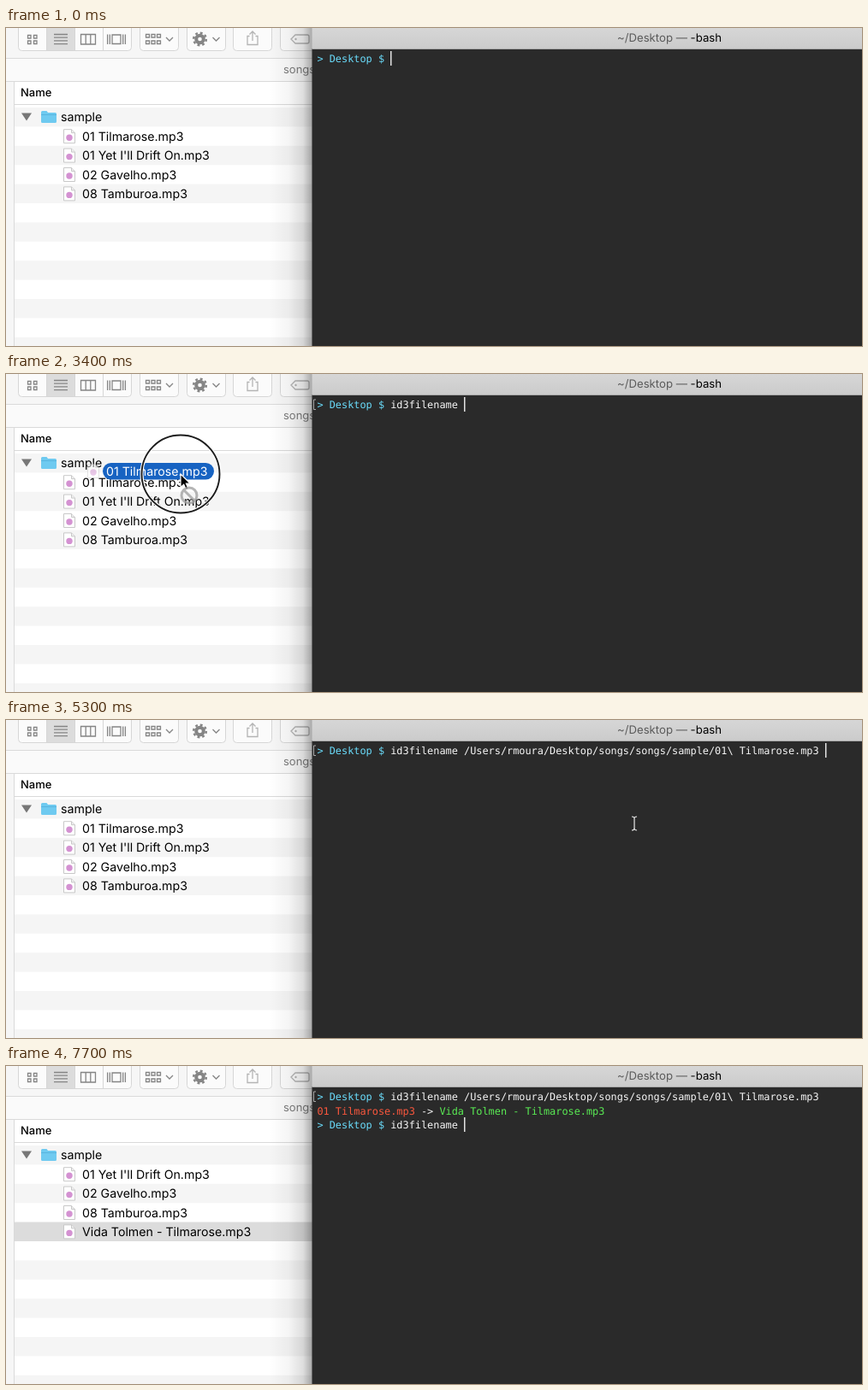
Animation of 1000x372 px, one loop 8000 ms. Source, as an HTML page:

```html
<!DOCTYPE html>
<html lang="en">
<head>
<meta charset="utf-8">
<title>Renaming a song from its tags</title>
<style>
  html, body { margin: 0; width: 100%; height: 100%; overflow: hidden; background: #fff; }
  svg { display: block; width: 1000px; height: 372px; }
  text { white-space: pre; text-rendering: geometricPrecision; }
  .ui { font-family: Inter, Roboto, sans-serif; font-size: 14.2px; fill: #000; }
  .head { font-size: 13px; font-weight: 500; }
  .title { font-size: 13.2px; }
  .mono { font-family: "DejaVu Sans Mono", "Liberation Mono", monospace; font-size: 11.88px; fill: #f6f6f6; }
  .prompt { fill: #6adcfb; }
  .old { fill: #fb573d; }
  .new { fill: #5aeb54; }
  .btn { fill: #fbfbfb; stroke: #d6d6d6; }
  .ico { fill: none; stroke: #858585; stroke-width: 1.3; }
  .pale { fill: none; stroke: #b4b4b4; stroke-width: 1.3; }
</style>
</head>
<body>
<svg viewBox="0 0 1000 372">
  <defs>
    <linearGradient id="shade">
      <stop offset="0" stop-color="#000" stop-opacity="0"/>
      <stop offset=".45" stop-color="#000" stop-opacity=".04"/>
      <stop offset=".78" stop-color="#000" stop-opacity=".13"/>
      <stop offset="1" stop-color="#000" stop-opacity=".34"/>
    </linearGradient>
    <linearGradient id="bar" x2="0" y2="1">
      <stop offset="0" stop-color="#d6d6d6"/>
      <stop offset="1" stop-color="#cbcbcb"/>
    </linearGradient>
    <g id="doc">
      <path d="M.5.5h9l4 4v12h-13z" fill="#fff" stroke="#c8c8c8"/>
      <path d="M9.5.5v4h4" fill="#eee" stroke="#c8c8c8"/>
      <circle cx="7" cy="10" r="3.7" fill="#d492d2"/>
    </g>
  </defs>

  <!-- file window -->
  <rect width="358" height="372" fill="#fff"/>
  <rect width="358" height="35" fill="#f6f6f6"/>
  <rect y="36" width="358" height="26" fill="#fafafa"/>
  <rect y="62" width="9" height="310" fill="#f6f6f6"/>
  <path d="M0 35.5H358M0 62.5H358M9.5 62V372M10 89.5H358" stroke="#dadada"/>
  <g id="stripes" fill="#f5f5f5"></g>

  <rect class="btn" x="14.5" y="-5.5" width="132" height="32" rx="4"/>
  <rect x="47" y="0" width="33" height="26" fill="#dcdcdc"/>
  <path d="M47.5 0V26M80.5 0V26M113.5 0V26" stroke="#d6d6d6"/>
  <path class="ico" d="M25.5 8.5h3.5v3.5h-3.5zM32.5 8.5h3.5v3.5h-3.5zM25.5 15h3.5v3.5h-3.5zM32.5 15h3.5v3.5h-3.5z"/>
  <path class="ico" d="M56 7.5h16M56 11.2h16M56 14.9h16M56 18.6h16"/>
  <path class="ico" d="M87.5 7.5h17v11.5h-17zM93.2 7.5v11.5M98.8 7.5v11.5"/>
  <path class="ico" d="M124 8h10v10.5h-10zM118.6 7.5v11.5M121.3 7.5v11.5M136.7 7.5v11.5M139.4 7.5v11.5"/>
  <rect class="btn" x="156.5" y="-5.5" width="45" height="32" rx="4"/>
  <path class="ico" d="M163.5 7.5h4v3.5h-4zM170 7.5h4v3.5h-4zM176.5 7.5h4v3.5h-4zM163.5 15h4v3.5h-4zM170 15h4v3.5h-4zM176.5 15h4v3.5h-4zM187 11l4 4 4-4"/>
  <rect class="btn" x="211.5" y="-5.5" width="45" height="32" rx="4"/>
  <circle cx="226.5" cy="13" r="4.3" fill="none" stroke="#858585" stroke-width="4"/>
  <circle cx="226.5" cy="13" r="7.3" fill="none" stroke="#858585" stroke-width="2.5" stroke-dasharray="2.87"/>
  <path class="ico" d="M241.5 11l4 4 4-4"/>
  <rect class="btn" x="265.5" y="-5.5" width="45" height="32" rx="4"/>
  <path class="pale" d="M291.5 9.5h2.5v10h-12v-10h2.5M288 15V4M284.5 7.5l3.5-3.5 3.5 3.5"/>
  <rect class="btn" x="320.5" y="-5.5" width="60" height="32" rx="4"/>
  <path class="pale" d="M333 13l5-5h14a2 2 0 0 1 2 2v6a2 2 0 0 1-2 2h-14z"/>
  <circle cx="338.5" cy="13" r="1.2" fill="#b4b4b4"/>

  <text class="ui" style="font-size:13px;fill:#7b7b7b" x="324" y="53">songs</text>
  <text class="ui head" x="17" y="80">Name</text>
  <path d="M18 99.5h12l-6 9z" fill="#777"/>
  <path d="M41 98.5q0-1.500 1.500-1.500h5l1.500 2h8.500q1.500 0 1.500 1.500v9q0 1.500-1.500 1.500h-15q-1.500 0-1.500-1.500z" fill="#6fcaf0"/>
  <path d="M41 101.5h18" stroke="#57b4df"/>
  <text class="ui" x="64" y="109">sample</text>
  <g id="files"></g>
  <rect x="308" width="50" height="372" fill="url(#shade)"/>

  <!-- terminal window -->
  <rect x="357.5" width="642.5" height="25" fill="url(#bar)"/>
  <rect x="357.5" y="24" width="642.5" height="348" fill="#2a2a2a"/>
  <path d="M357.5 24.5H1000" stroke="#a9a9a9"/>
  <rect id="target" x="359" y="26" width="640" height="345" fill="none" stroke="#444" stroke-width="2"/>
  <text class="ui title" x="775" y="15.5" text-anchor="middle"><tspan fill="#5a5a5a">~/Desktop — </tspan>-bash</text>
  <path id="mark" d="M362 30h-2.500v11.500h2.500" fill="none" stroke="#a8a8a8"/>
  <g id="lines"></g>
  <rect id="caret" width="1.5" height="17" fill="#e2e2e2"/>

  <!-- pointer and dragged file -->
  <g id="drag">
    <use id="ghost" href="#doc" x="-18" y="1"/>
    <rect width="130" height="19.5" rx="9.7" fill="#1763c2"/>
    <text id="dragName" class="ui" style="fill:#fff" x="4" y="15"></text>
  </g>
  <g id="ring" fill="none">
    <circle stroke="#fff" stroke-width="4"/>
    <circle stroke="#1c1c1c" stroke-width="1.9"/>
  </g>
  <g id="mouse">
    <path id="arrow" d="M0 0V15.5L3.7 12.2 6.3 18.2 9 17 6.4 11.2H11.3Z" fill="#000" stroke="#fff" stroke-width="1.2"/>
    <path id="beam" d="M-3-8q3 0 3 2.500V5.500q0 2.500-3 2.500M3-8q-3 0-3 2.500M3 8q-3 0-3-2.500" fill="none" stroke="#e6e6e6" stroke-width="1.2"/>
    <g id="noDrop" transform="translate(10 25)" fill="none" stroke="#a2a2a2" stroke-width="3" opacity=".8">
      <circle r="9"/>
      <path d="M-6-6L6 6"/>
    </g>
  </g>
</svg>
<script>
const LOOP = 8000, STEP = 100;
const ROW = 22.4, TOP = 93, CELL = 7.15, LEFT = 363.4;
const SONG = "Tilmarose.mp3", BEFORE = "01 " + SONG, AFTER = "Vida Tolmen - " + SONG;
const FILES = [BEFORE, "01 Yet I'll Drift On.mp3", "02 Gavelho.mp3", "08 Tamburoa.mp3"];
const COMMAND = "id3filename ";
const PATH = "/Users/rmoura/Desktop/songs/songs/sample/01\\ " + SONG;

// Each row: time, then values
const POINTER = [[1200, 548, 328], [1400, 520, 300], [1700, 420, 205], [2000, 314, 150], [2300, 312, 149],
  [2700, 240, 134], [3000, 178, 128], [3200, 176, 128], [3300, 182, 125], [3400, 204, 117], [3500, 300, 118],
  [3600, 476, 120], [3700, 640, 121], [3800, 715, 122], [4000, 732, 121], [5900, 735, 121]];
const DRAG = [[3300, 90, 113], [3400, 113, 104], [3500, 200, 106], [3600, 375, 107], [3700, 538, 108],
  [3800, 614, 108.5], [4000, 646, 107.5]];
const RING = [[3200, 72, 0.3], [3300, 58, 1], [3400, 45.5, 1], [3500, 34, 1], [3600, 25, 1], [4800, 25, 1],
  [4900, 38, 0.8], [5100, 66, 0]];
const SLIDE = [[6100, 0], [6200, 0.02], [6600, 0.02], [6700, 0.2], [6800, 0.5], [6900, 0.8], [7000, 0.95], [7100, 1]];
const TYPING = [[200, 1], [300, 2], [500, 3], [1000, COMMAND.length]];
const RETYPING = [[6900, 1], [7000, 2], [7200, 3], [7700, COMMAND.length]];

const $ = id => document.getElementById(id);
const show = (node, on) => node.style.display = on ? "" : "none";
const move = (node, x, y) => node.setAttribute("transform", `translate(${x} ${y})`);

function add(parent, tag, attrs, content = "") {
  const node = document.createElementNS("http://www.w3.org/2000/svg", tag);
  for (const key in attrs) node.setAttribute(key, attrs[key]);
  node.textContent = content;
  return parent.appendChild(node);
}

function lerp(keys, t) {
  const next = keys.findIndex(k => k[0] > t);
  if (next === 0) return keys[0].slice(1);
  if (next < 0) return keys[keys.length - 1].slice(1);
  const a = keys[next - 1], b = keys[next], f = (t - a[0]) / (b[0] - a[0]);
  return a.slice(1).map((v, i) => v + (b[i + 1] - v) * f);
}

const typed = (keys, t) => keys.reduce((n, [at, count]) => t >= at ? count : n, 0);

const write = (line, column, kind, content = "") =>
  add($("lines"), "text", { class: "mono " + kind, x: LEFT + column * CELL, y: 40 + line * 16.5 }, content);

const stripe = row => add($("stripes"), "rect", { x: 10, y: TOP + row * ROW, width: 348, height: ROW });

for (let row = 0; row < 13; row += 2) stripe(row);
const picked = stripe(FILES.length);
picked.setAttribute("fill", "#dcdcdc");

const files = FILES.map(name => {
  const group = add($("files"), "g", {});
  add(group, "use", { href: "#doc", x: 67, y: -8.5 });
  return { group, label: add(group, "text", { class: "ui", x: 89, y: 5 }, name) };
});
$("dragName").textContent = BEFORE;

write(0, 0, "prompt", "> Desktop $");
const command = write(0, 12, "");
const output = [
  write(1, 0, "old", BEFORE),
  write(1, 17, "", "->"),
  write(1, 20, "new", AFTER),
  write(2, 0, "prompt", "> Desktop $")
];
const again = write(2, 12, "");

function drawTerminal(t) {
  const first = typed(TYPING, t), second = typed(RETYPING, t);
  const dropped = t >= 4900, done = t >= 6200;
  command.textContent = COMMAND.slice(0, first) + (dropped ? PATH : "");
  again.textContent = COMMAND.slice(0, second);
  output.forEach(node => show(node, done));
  show($("mark"), t >= 1200);
  show($("target"), t >= 3600 && !dropped);

  let line = 0, column = 12 + first;
  if (done) [line, column] = [2, 12 + second];
  else if (t >= 6000) [line, column] = [1, 0];
  else if (dropped) column += PATH.length + 1;
  move($("caret"), Math.round(LEFT + column * CELL), 27 + line * 16.5);
}

function drawFiles(t) {
  const [slide] = lerp(SLIDE, t);
  files.forEach(({ group }, i) => move(group, 0, 126.7 + ROW * (i ? i - slide : 3 * slide)));
  files[0].label.textContent = t >= 6200 ? AFTER : BEFORE;
  show(picked, t >= 6900);
}

function drawPointer(t) {
  const [x, y] = lerp(POINTER, t);
  const [r, alpha] = lerp(RING, t);
  const dragging = t >= 3300 && t < 4900;
  const inTerminal = x > 358;
  show($("mouse"), t >= 1200 && t < 6000);
  move($("mouse"), x, y);
  show($("arrow"), dragging || !inTerminal);
  show($("beam"), !dragging && inTerminal);
  show($("noDrop"), dragging && !inTerminal);

  show($("drag"), dragging);
  move($("drag"), ...lerp(DRAG, t));
  $("ghost").setAttribute("opacity", inTerminal ? 1 : 0.5);

  show($("ring"), t >= 3200 && t < 5100);
  move($("ring"), x, y);
  $("ring").setAttribute("opacity", alpha);
  for (const circle of $("ring").children) circle.setAttribute("r", r);
}

const start = performance.now();
function frame() {
  const t = Math.floor((performance.now() - start) % LOOP / STEP) * STEP;
  drawTerminal(t);
  drawFiles(t);
  drawPointer(t);
  requestAnimationFrame(frame);
}
frame();
</script>
</body>
</html>
```
